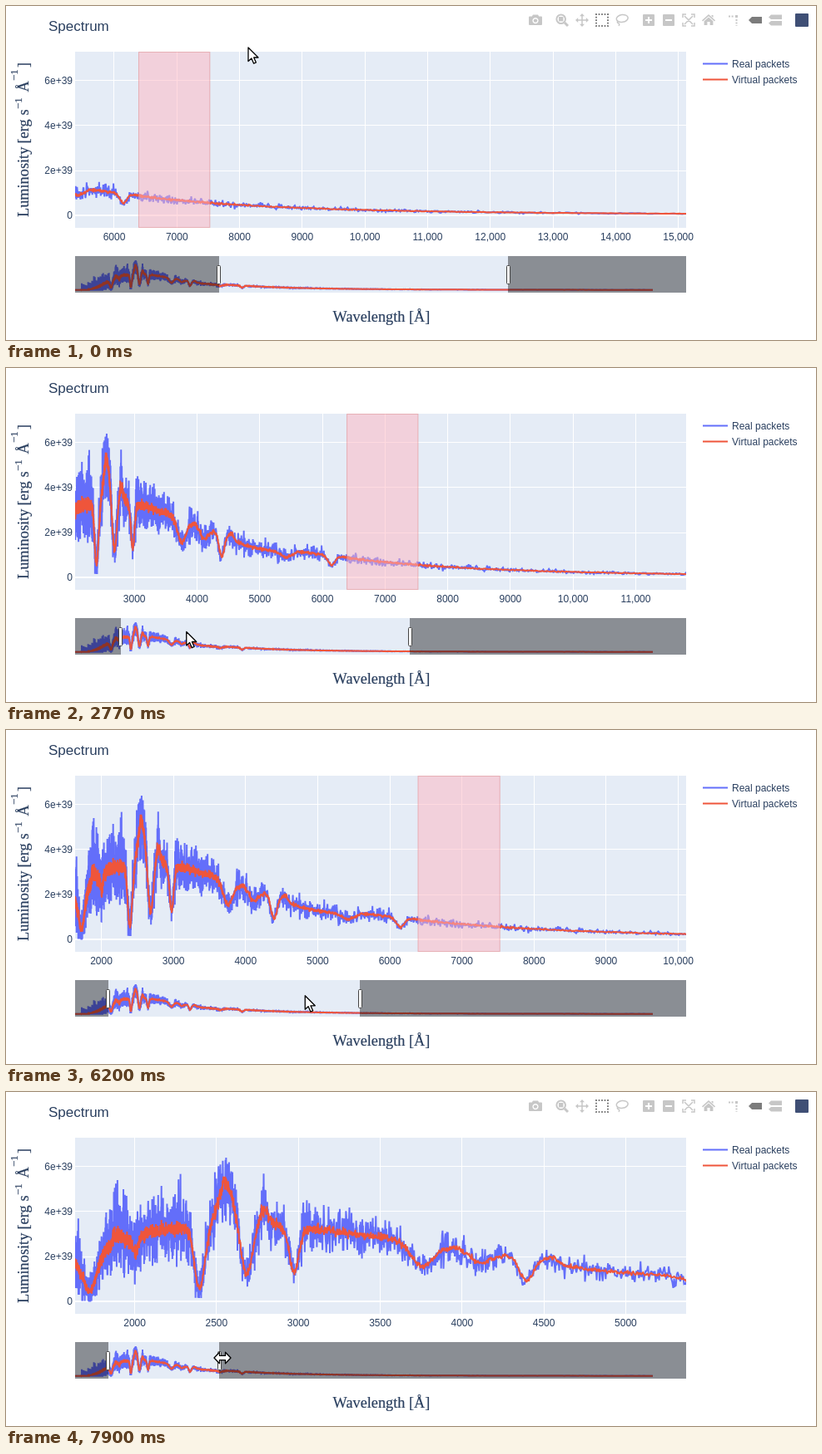
An HTML page that plays this animation: 973 by 402 pixels, repeating every 8000 ms.

```html
<!DOCTYPE html>
<html lang="en">
<head>
<meta charset="utf-8">
<title>Spectrum</title>
<style>
  html, body { margin: 0; width: 100%; height: 100%; overflow: hidden; background: #fff; }
  svg { display: block; }
  text { font-family: "Liberation Sans", Arial, sans-serif; font-size: 12px; fill: #2a3f5f; white-space: pre; }
  .serif, .serif tspan { font-family: "Liberation Serif", "Times New Roman", serif; font-size: 18.3px; }
  .serif { stroke: #2a3f5f; stroke-width: .2; }
  .serif .sup { font-size: 13px; }
  .mid { text-anchor: middle; }
  .end { text-anchor: end; }
  .bg { fill: #e5ecf6; }
  .trace { fill: none; stroke-width: 2; stroke-miterlimit: 2; vector-effect: non-scaling-stroke; }
  .real { stroke: #636efa; }
  .virt { stroke: #ef553b; }
  .grid { fill: none; stroke: #fff; shape-rendering: crispEdges; }
  .mask { fill: #000; fill-opacity: .4; shape-rendering: crispEdges; }
  .handle { fill: #fff; stroke: #444; }
  .icon { fill: #c7c7c7; }
  .line { fill: none; stroke: #c7c7c7; stroke-width: 2; }
  .thin { stroke-width: 1.5; }
  .on { fill: #7c7c7c; }
  .line.on { fill: none; stroke: #7c7c7c; }
  .cut { fill: none; stroke: #fff; stroke-width: 2; }
  .pointer { fill: #fff; stroke: #000; stroke-width: 1.3; stroke-linejoin: round; }
</style>
</head>
<body>
<svg width="973" height="402" viewBox="0 0 973 402">
  <defs>
    <clipPath id="plotClip"><rect x="83" y="55" width="734" height="212"/></clipPath>
    <clipPath id="sliderClip"><rect x="83" y="301" width="734" height="44"/></clipPath>
  </defs>

  <text x="51" y="30" style="font-size:17px">Spectrum</text>
  <rect class="bg" x="83" y="55" width="734" height="212"/>
  <path id="gridX" class="grid"/>
  <path class="grid" d="M83 89.5H817M83 143.5H817M83 198.5H817"/>
  <path class="grid" stroke-width="2" d="M83 252H817"/>
  <g clip-path="url(#plotClip)">
    <g id="main"><path class="trace real"/><path class="trace virt"/></g>
    <rect id="band" y="55.5" height="211" fill="#ffb6c1" fill-opacity=".5" stroke="#e07878" stroke-opacity=".45"/>
  </g>
  <g id="ticks"></g>
  <text class="end" x="80" y="94">6e+39</text>
  <text class="end" x="80" y="148">4e+39</text>
  <text class="end" x="80" y="202">2e+39</text>
  <text class="end" x="80" y="256">0</text>

  <rect class="bg" x="83" y="301" width="734" height="44"/>
  <g clip-path="url(#sliderClip)">
    <g id="mini"><path class="trace real"/><path class="trace virt"/></g>
  </g>
  <rect id="maskL" class="mask" x="83" y="301" height="44"/>
  <rect id="maskR" class="mask" y="301" height="44"/>
  <rect id="handleL" class="handle" y="312.5" width="4" height="22" rx="1"/>
  <rect id="handleR" class="handle" y="312.5" width="4" height="22" rx="1"/>

  <text class="serif mid" x="451" y="380">Wavelength [Å]</text>
  <text class="serif" transform="translate(27 254) rotate(-90)"><tspan x="0">Luminosity</tspan><tspan x="88.5">[erg</tspan><tspan x="122.5">s</tspan><tspan class="sup" x="130" y="-8">−1</tspan><tspan x="150.5" y="0">Å</tspan><tspan class="sup" x="164" y="-13">−1</tspan><tspan x="180" y="0">]</tspan></text>

  <path class="trace real" d="M837 69.5h30"/>
  <path class="trace virt" d="M837 88.5h30"/>
  <text x="872" y="74">Real packets</text>
  <text x="872" y="93">Virtual packets</text>

  <g id="bar">
    <g transform="translate(636 17)">
      <path class="icon" fill-rule="evenodd" d="M-8-3.5q0-1 1-1h2.8l1.2-2h6l1.2 2H7q1 0 1 1V5q0 1-1 1H-7q-1 0-1-1ZM0-3a3.6 3.6 0 1 0 .01 0Z"/>
      <circle class="icon" cy=".6" r="2.2"/>
    </g>
    <g transform="translate(668 17)">
      <circle class="line" cx="-1.3" cy="-1.3" r="5.3"/>
      <path class="line" style="stroke-width:3" d="M3 3L7 7"/>
      <rect class="icon" x="-4" y="-4" width="5.4" height="5.4"/>
    </g>
    <g transform="translate(692 17)">
      <path class="line thin" d="M-6 0H6M0-6V6"/>
      <path class="icon" d="M-8 0l3.2-3v6ZM8 0l-3.2-3v6ZM0-8l-3 3.2h6ZM0 8l-3-3.2h6Z"/>
    </g>
    <rect class="line on" x="709" y="10" width="14" height="14" stroke-dasharray="1.75" stroke-dashoffset=".875"/>
    <g transform="translate(740 17)">
      <ellipse class="line thin" cx=".5" cy="-2" rx="7" ry="4.4" transform="rotate(-8)"/>
      <path class="line thin" d="M-5 1q-1.5 2 .5 2.6q2 .6 .6 3.4"/>
    </g>
    <g transform="translate(772 17)">
      <rect class="icon" x="-7" y="-7" width="14" height="14" rx="1"/>
      <path class="cut" d="M-4 0h8M0-4v8"/>
    </g>
    <g transform="translate(796 17)">
      <rect class="icon" x="-7" y="-7" width="14" height="14" rx="1"/>
      <path class="cut" d="M-4 0h8"/>
    </g>
    <path class="line thin" transform="translate(820 17)" d="M-7-3v-4h4M3-7h4v4M7 3v4h-4M-3 7h-4v-4M-5-5L5 5M5-5L-5 5"/>
    <path class="icon" d="M844 10l8 7.2-1 1.2-7-6.2-7 6.2-1-1.2ZM844 13.4l5.4 4.8V23h-3.8v-4h-3.2v4h-3.8v-4.8ZM847.5 11h2v3l-2-1.8Z"/>
    <path class="line" stroke-dasharray="2 1.6" d="M868 12.5h7M877.5 16v8"/>
    <path class="icon" d="M876 11h3v3h-3Z"/>
    <path class="icon on" d="M892 17l4-4h12v8h-12Z"/>
    <path class="icon" d="M916 13.5l3-3h13v5.6h-13ZM916 20.7l3-2.8h13v5.6h-13Z"/>
    <rect x="948" y="9" width="16" height="16" rx="1" fill="#3f4f75"/>
  </g>

  <path id="arrow" class="pointer" d="M0 0V16.5L3.9 13 6.6 19.2 9.4 18 6.7 12H12Z"/>
  <path id="resize" class="pointer" d="M-10 0L-3.5-6.8V-2.6H3.5V-6.8L10 0 3.5 6.8V2.6H-3.5V6.8Z"/>
</svg>

<script>
const LOOP = 8000, LEFT = 83, RIGHT = 817, WIDTH = RIGHT - LEFT;
const MINI_MIN = 513, MINI_STEP = 28.08;   // wavelength at the left edge, and per pixel
const BAND = [6392, 7526];
const $ = id => document.getElementById(id);
const set = (el, attrs) => { for (const k in attrs) el.setAttribute(k, attrs[k]); };
const clamp = u => Math.max(0, Math.min(1, u));
const mix = (a, b, u) => a + (b - a) * u;

// Spectral lines on a black body: centre, width, height
const LINES = [
  [1728, 60, -1.65], [1890, 35, .35], [2003, 25, -.65], [2396, 45, -2.8], [2555, 60, 1.85],
  [2684, 48, -2.25], [2791, 35, .7], [2974, 42, -2], [3755, 100, -1.05], [4110, 90, -.5],
  [4392, 55, -1], [4545, 50, .25], [4900, 550, -.3], [5420, 130, -.28], [6145, 75, -.42]
];
const blackBody = w => 1.836 * (8000 / w) ** 5 / (Math.exp(13000 / w) - 1);
const mean = w => Math.max(0, LINES.reduce(
  (sum, [c, s, h]) => sum + h * Math.exp(-(((w - c) / s) ** 2)), blackBody(w)));

let seed = 7;
function rand() {
  seed = seed + 0x6D2B79F5 | 0;
  let r = Math.imul(seed ^ seed >>> 15, 1 | seed);
  r = r + Math.imul(r ^ r >>> 7, 61 | r) ^ r;
  return ((r ^ r >>> 14) >>> 0) / 4294967296;
}
const gauss = () => (rand() + rand() + rand() + rand() - 2) * 1.73;
function poisson(m) {
  const limit = Math.exp(-m);
  let n = 0, p = rand();
  while (p > limit) { n++; p *= rand(); }
  return n;
}

// Bins are even in frequency; photon noise grows toward short wavelengths
function buildTraces() {
  const real = [], virt = [];
  for (let f = 1 / 20000; f < 1 / 700; f += 1.95e-7) {
    const w = 1 / f, m = mean(w), unit = (880 / w) ** 2;
    const x = w.toFixed(1) + ' ';
    real.push(x + (poisson(m / unit) * unit).toFixed(3));
    virt.push(x + Math.max(0, m + gauss() * .23 * Math.sqrt(m * unit)).toFixed(3));
  }
  return [real, virt].map(pts => 'M' + pts.join('L') + 'L500 0');
}
const paths = buildTraces();
for (const id of ['main', 'mini'])
  paths.forEach((d, i) => $(id).children[i].setAttribute('d', d));
set($('mini'), { transform:
  `translate(${LEFT - MINI_MIN / MINI_STEP} 341.8) scale(${1 / MINI_STEP} -5.6)` });

// Dragging redraws the plot in steps of 130 ms
function stepped(t, start, end, ease) {
  if (t >= end) return 1;
  const u = Math.floor((t - start) / 130) * 130 / (end - start);
  return ease(clamp(u));
}
function limits(t) {
  const pan = stepped(t, 2120, 3070, u => 1 - (1 - u) ** 1.9);
  const zoom = stepped(t, 5790, 7100, u => u ** 1.28);
  const lo = mix(5376, 1636, pan);
  return [lo, mix(lo + 9749, 5369, zoom)];
}

// Straight pointer moves: start, end, x, y
const MOVES = [
  [30, 500, 326, 327], [700, 900, 330, 322], [1270, 2940, 204, 317],
  [3870, 4070, 363, 319], [4270, 4770, 473, 323], [5400, 6900, 260, 317], [7570, 7700, 260, 320]
];
const pointer = t => MOVES.reduce(([x, y], [a, b, toX, toY]) => {
  const u = clamp((t - a) / (b - a));
  return [mix(x, toX, u), mix(y, toY, u)];
}, [291, 50]);

function fade(t, start) {
  const u = clamp((t - start) / 270);
  return u * u * (3 - 2 * u);
}

function drawView(lo, hi) {
  const k = WIDTH / (hi - lo), px = w => LEFT + (w - lo) * k;
  const miniX = w => LEFT + (w - MINI_MIN) / MINI_STEP;
  const step = hi - lo > 5000 ? 1000 : 500;
  let grid = '', labels = '';
  for (let w = Math.ceil(lo / step) * step; w <= hi; w += step) {
    const text = w < 10000 ? w : w / 1000 + ',000';
    grid += `M${Math.floor(px(w)) + .5} 55V267`;
    labels += `<text class="mid" x="${px(w).toFixed(2)}" y="282">${text}</text>`;
  }
  set($('gridX'), { d: grid });
  $('ticks').innerHTML = labels;
  set($('main'), { transform: `translate(${LEFT - lo * k} 251.5) scale(${k} -27)` });
  set($('band'), { x: px(BAND[0]), width: (BAND[1] - BAND[0]) * k });
  const a = miniX(lo), b = miniX(hi);
  set($('maskL'), { width: a - LEFT });
  set($('maskR'), { x: b, width: RIGHT - b });
  set($('handleL'), { x: Math.round(a) - 2.5 });
  set($('handleR'), { x: Math.round(b) - 1.5 });
}

let shown = '';
function draw(t) {
  const view = limits(t), key = view.join();
  if (key !== shown) { drawView(...view); shown = key; }
  $('bar').style.opacity = 1 - fade(t, 1720) + fade(t, 3600) - fade(t, 5400) + fade(t, 7570);
  const resizing = t >= 3600 && t < 3960 || t >= 7570;
  const transform = `translate(${pointer(t)})`;
  set($('arrow'), { transform, visibility: resizing ? 'hidden' : 'visible' });
  set($('resize'), { transform, visibility: resizing ? 'visible' : 'hidden' });
}

const start = performance.now();
function tick() {
  draw((performance.now() - start) % LOOP);
  requestAnimationFrame(tick);
}
tick();
</script>
</body>
</html>
```
